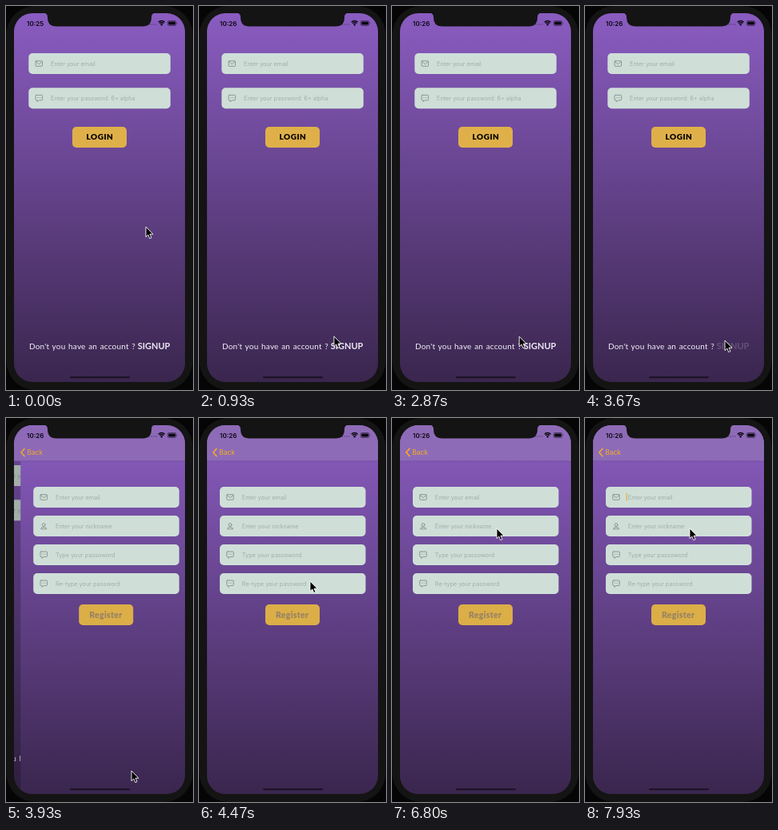
Write an HTML page that moves like this. It is 234 px wide and 480 px high and loops after 8000 ms.

```html
<!DOCTYPE html>
<html lang="en">
<head>
<meta charset="utf-8">
<style>
  html, body { margin: 0; width: 100%; height: 100%; overflow: hidden; background: #050505; }
  svg { display: block; width: 100vw; height: 100vh; }
  text { font-family: Inter, Roboto, sans-serif; white-space: pre; }
  .hand { font-family: Lato, "Open Sans", sans-serif; }
  .hint { font-size: 7.3px; fill: #a0aeaa; }
  .icon { fill: none; stroke: #82918c; stroke-width: .9; stroke-linejoin: round; stroke-linecap: round; }
</style>
</head>
<body>
<svg id="stage" viewBox="0 0 234 480">
  <defs>
    <linearGradient id="sky" x1="0" y1="0" x2="0" y2="1">
      <stop offset="0" stop-color="#8a5cc1"/>
      <stop offset="1" stop-color="#3a264e"/>
    </linearGradient>
    <clipPath id="screen"><rect x="10" y="9" width="214" height="461" rx="23"/></clipPath>
    <g id="mail" class="icon">
      <rect x="-4.2" y="-3.3" width="8.4" height="6.6" rx=".8"/>
      <path d="M-4-2.6 0 .7 4-2.6"/>
    </g>
    <g id="chat" class="icon">
      <path d="M-3.3-4H3.3Q4.3-4 4.3-3V1.5Q4.3 2.5 3.3 2.5H0L-2.2 4.5V2.5H-3.3Q-4.3 2.5-4.3 1.5V-3Q-4.3-4-3.3-4Z"/>
      <path d="M-2-.8h.1M0-.8h.1M2-.8h.1"/>
    </g>
    <g id="person" class="icon">
      <circle cy="-1.5" r="1.9"/>
      <path d="M-3.5 3.4Q-3.3 1.3 0 1.3T3.5 3.4Z"/>
    </g>
  </defs>

  <rect x=".5" width="233" height="480" rx="36" fill="#141414"/>

  <g clip-path="url(#screen)">
    <g id="login">
      <rect x="10" y="9" width="214" height="461" fill="url(#sky)"/>
      <g id="loginFields"></g>
      <g id="loginButton">
        <rect x="83" y="151" width="68" height="26" rx="5" fill="#dfb049"/>
        <text class="hand" x="100.5" y="167.3" font-size="10" font-weight="900" letter-spacing=".5">LOGIN</text>
      </g>
      <text class="hand" x="29" y="428.5" font-size="10" letter-spacing=".2" word-spacing=".8" fill="#f4f0f8">Don't you have an account ?</text>
      <text id="signup" class="hand" x="164.7" y="429" font-size="11" font-weight="700" fill="#eee8f3">SIGNUP</text>
      <rect id="dim" x="10" y="9" width="214" height="461"/>
    </g>

    <g id="register">
      <rect x="10" y="9" width="214" height="461" fill="url(#sky)"/>
      <g id="registerFields"></g>
      <rect x="83" y="233" width="68" height="26" rx="5" fill="#dcae48"/>
      <text class="hand" x="96" y="249.5" font-size="10.5" font-weight="900" letter-spacing=".3" fill="#978463">Register</text>
      <rect id="caret" x="51.6" y="93.8" width="1.2" height="9.8" fill="#f0a83a"/>
    </g>

    <g id="navBar">
      <rect x="10" y="9" width="214" height="45" fill="#8e6bb7"/>
      <rect x="10" y="53.6" width="214" height=".6" fill="#69498f"/>
      <g id="back">
        <path d="M22 38.3 17.8 43 22 47.7" fill="none" stroke="#f5ae1c" stroke-width="1.5" stroke-linecap="round" stroke-linejoin="round"/>
        <text x="25.3" y="46" font-size="8.4" fill="#f5ae1c">Back</text>
      </g>
    </g>

    <text id="clock" x="26" y="24.6" font-size="8" font-weight="600" fill="#0c0812"></text>
    <g fill="#0c0812">
      <path d="M179 23h1.4m1.3 0h1.4m1.3 0h1.4m1.3 0h1.4" stroke="#4d3769" stroke-width="1.2"/>
      <path d="M194.7 25 193 22.9Q194.7 21.6 196.4 22.9Z"/>
      <path d="M192.1 21.8Q194.7 19.7 197.3 21.8M190.6 20.2Q194.7 16.8 198.8 20.2" fill="none" stroke="#0c0812" stroke-width="1.3"/>
      <rect x="202.3" y="18.5" width="10.6" height="6" rx="1.6" fill="none" stroke="#2b1c3c" stroke-width=".6"/>
      <rect x="203.3" y="19.5" width="8.6" height="4" rx=".8"/>
      <path d="M213.8 20.5q1 1 0 2Z"/>
    </g>
    <rect x="80" y="463" width="75" height="2.2" rx="1.1" fill="#1d1327"/>
  </g>

  <path d="M47 8.5Q52 9 52 14Q52 25.5 63 25.5H171Q182 25.5 182 14Q182 9 187 8.5Z" fill="#141414"/>
  <path id="cursor" d="M0 0V12.6L2.8 10 4.8 14.6 7 13.6 5 9.2H9Z" fill="#000" stroke="#fff" stroke-width=".9" stroke-linejoin="round"/>
</svg>
<script>
const LOOP = 8000;
const PUSH_START = 3690;
const $ = id => document.getElementById(id);
const clamp = v => Math.max(0, Math.min(1, v));
const ramp = (t, from, to) => clamp((t - from) / (to - from));

function field(x, y, width, icon, hint) {
  return `<rect x="${x}" y="${y}" width="${width}" height="26" rx="5" fill="#cfdfd8"/>
    <use href="#${icon}" x="${x + 13}" y="${y + 13}"/>
    <text class="hint" x="${x + 27.8}" y="${y + 15.6}">${hint}</text>`;
}

$('loginFields').innerHTML =
  field(28.3, 59, 177.5, 'mail', 'Enter your email') +
  field(28.3, 102.3, 177.5, 'chat', 'Enter your password: 6+ alpha');

$('registerFields').innerHTML = [
  ['mail', 'Enter your email'],
  ['person', 'Enter your nickname'],
  ['chat', 'Type your passoword'],
  ['chat', 'Re-type your password']
].map(([icon, hint], i) => field(26, 86 + 36 * i, 182.5, icon, hint)).join('');

// Pointer stops: time, x, y
const stops = [
  [0, 175, 276], [60, 175, 276], [130, 168, 412], [1130, 169, 413],
  [1750, 135, 171], [2300, 135, 171], [2850, 159, 413], [3150, 175, 418],
  [3730, 175, 418], [3930, 157, 441], [4330, 142, 225], [4400, 142, 225],
  [4470, 139, 204], [4800, 118, 98], [5000, 118, 98], [5400, 131, 138],
  [LOOP, 131, 138]
];

function pointerAt(t) {
  const i = stops.findIndex(s => s[0] > t);
  const [t0, x0, y0] = stops[i - 1], [t1, x1, y1] = stops[i];
  const u = ramp(t, t0, t1), k = u * u * (3 - 2 * u);
  return [x0 + (x1 - x0) * k, y0 + (y1 - y0) * k];
}

// Opacity of a touchable that fades to a fifth while held
const pressed = (t, down, up) => 1 - .8 * (ramp(t, down, down + 120) - ramp(t, up, up + 150));

// Critically damped spring from 0 to 1
function spring(t) {
  const w = Math.max(0, t) * .021;
  return w > 11 ? 1 : 1 - (1 + w) * Math.exp(-w);
}

function caretOpacity(t) {
  if (t < 4880) return 0;
  const phase = (t + 200) % 1000;
  return ramp(phase, 0, 100) - ramp(phase, 470, 570);
}

const shift = (id, x, y = 0) => $(id).setAttribute('transform', `translate(${x} ${y})`);
const fade = (id, v) => $(id).setAttribute('opacity', v);

function draw(t) {
  const push = spring(t - PUSH_START);
  shift('login', -64 * push);
  fade('dim', .22 * push);
  shift('register', 214 * (1 - push));
  fade('navBar', push);
  shift('back', 30 * (1 - push));
  fade('loginButton', pressed(t, 2080, 2200));
  fade('signup', pressed(t, 3500, 3700));
  fade('caret', caretOpacity(t));
  $('clock').textContent = t < 700 ? '10:25' : '10:26';
  shift('cursor', ...pointerAt(t));
}

const start = performance.now();
function tick() {
  draw((performance.now() - start) % LOOP);
  requestAnimationFrame(tick);
}
tick();
</script>
</body>
</html>
```
